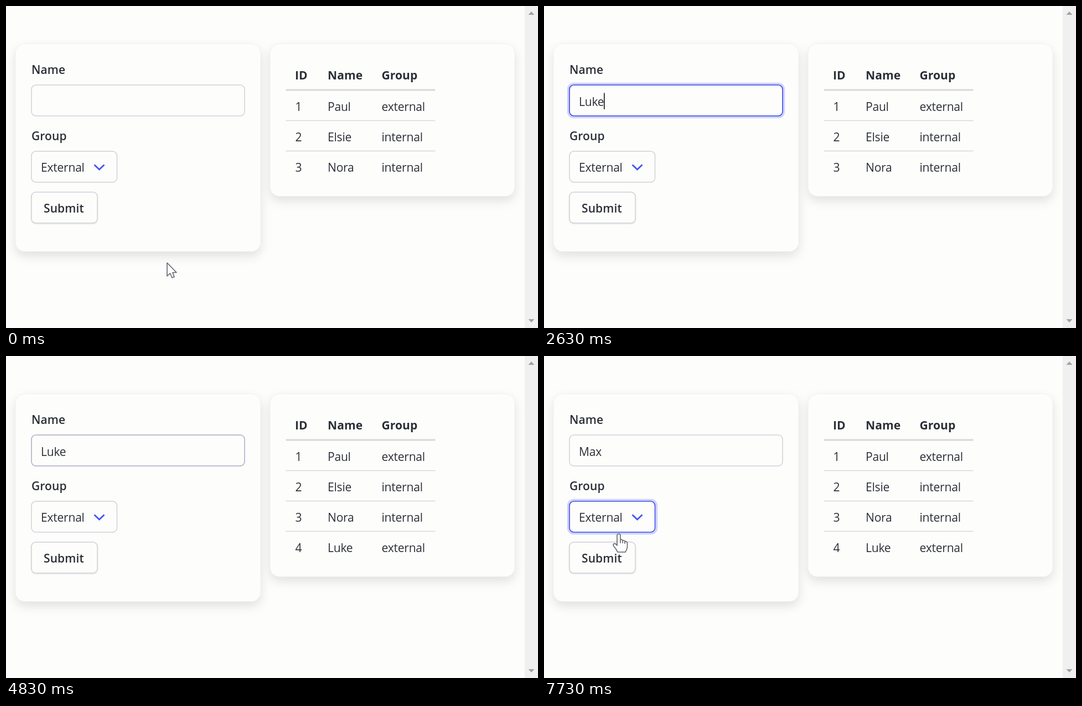
Recreate the animation shown at these times as an HTML page. Size 961 px wide and 583 px high, loop 8000 ms.

```html
<!DOCTYPE html>
<html lang="en">
<head>
<meta charset="utf-8">
<style>
html, body { margin: 0; width: 100%; height: 100%; overflow: hidden; background: #fdfdfc; }
svg { display: block; width: 961px; height: 583px; }
text { font: 21px "Open Sans", "Noto Sans", sans-serif; letter-spacing: -.2px; fill: #2b2f36; white-space: pre; }
.label { font-weight: 600; letter-spacing: .1px; }
.head { font-weight: 700; letter-spacing: .1px; }
.card { fill: #fdfdfc; stroke: #f0f0f1; filter: drop-shadow(0 8px 9px #0000001c); }
.box { fill: none; stroke: #d0d2d6; stroke-width: 1.5; }
.hover { fill: none; stroke: #b4b6cb; stroke-width: 1.5; }
.focus { fill: none; stroke: #4453f0; stroke-width: 1.6; }
.ring { fill: none; stroke: #ced3fb; stroke-width: 4.4; }
.line { stroke: #d6d8dc; stroke-width: 1.6; }
.cursor { fill: #fff; stroke: #62646c; stroke-width: 1.6; stroke-linejoin: round; }
</style>
</head>
<body>
<svg viewBox="0 0 961 583">
  <rect x="937" width="24" height="583" fill="#f0f0f0"/>
  <path d="M943.5 16l5.5-6 5.5 6zM943.5 567l5.5 6 5.5-6z" fill="#a2a2a2"/>

  <rect class="card" x="17" y="68.5" width="443" height="376" rx="17"/>
  <rect class="card" id="tableCard" x="477" y="68.5" width="442" height="276" rx="17"/>

  <text class="label" x="46" y="123">Name</text>
  <rect class="ring" id="inputRing" x="44" y="141" width="389" height="60" rx="10"/>
  <rect class="box" x="46" y="143" width="385" height="56" rx="8"/>
  <rect class="hover" id="inputHover" x="46" y="143" width="385" height="56" rx="8"/>
  <rect class="focus" id="inputFocus" x="46" y="143" width="385" height="56" rx="8"/>
  <rect id="selection" x="63" y="156" height="31" fill="#2d62cc"/>
  <text id="value" x="63" y="181"></text>
  <path id="caret" d="M0 157.5V187" stroke="#111" stroke-width="1.6"/>

  <text class="label" x="46" y="243">Group</text>
  <rect class="ring" id="selectRing" x="44" y="261" width="159" height="60" rx="10"/>
  <rect class="box" x="46" y="263" width="154.5" height="56" rx="8"/>
  <rect class="focus" id="selectFocus" x="46" y="263" width="154.5" height="56" rx="8"/>
  <text x="63" y="300">External</text>
  <path d="M159.5 287.5l9 8.5 9-8.5" fill="none" stroke="#4354f2" stroke-width="2.8"/>

  <rect class="box" x="46" y="337" width="119" height="56" rx="8" style="fill:#fdfdfc;filter:drop-shadow(0 1.5px 1px #0000001c)"/>
  <rect class="hover" id="buttonHover" x="46" y="337" width="119" height="56" rx="8" style="fill:#eeeef1"/>
  <text class="label" x="68" y="374">Submit</text>

  <g id="table">
    <text class="head" x="522" y="133">ID</text>
    <text class="head" x="581" y="133">Name</text>
    <text class="head" x="678.5" y="133">Group</text>
    <path class="line" d="M505.5 152H775.5" style="stroke-width:2.8"/>
  </g>

  <path class="cursor" id="arrow" d="M0 0V24L5.5 19 9 27 13 25.5 10 17.5H17Z"/>
  <path class="cursor" id="hand" d="M-3 3Q-3 0 0 0T3 3V11Q5.500 9 7 12Q10 11 11 13.500Q15.500 13 15.500 18V24Q15 28 12 33H-2Q-4 28-8.500 23Q-11 20-9 18Q-6 16.500-3 21ZM3 11V17M7 12V17M11 14V18"/>
</svg>
<script>
const $ = id => document.getElementById(id);
const set = (id, name, value) => $(id).setAttribute(name, value);
const clamp = v => Math.max(0, Math.min(1, v));

const rows = [["Paul", "external"], ["Elsie", "internal"], ["Nora", "internal"], ["Luke", "external"]];
$("table").innerHTML += rows.map(([name, group], i) => {
  const y = 190 + 55 * i;
  const line = i ? `<path class="line" d="M505.5 ${y - 37.5}H775.5"/>` : "";
  return `<g id="row${i + 1}">${line}<text x="522.5" y="${y}">${i + 1}</text>
    <text x="581" y="${y}">${name}</text><text x="678.5" y="${y}">${group}</text></g>`;
}).join("");

// Moves: start, end, target x, target y
const home = [291, 465];
const moves = [
  [500, 960, 210, 172],
  [3170, 3600, 59, 362],
  [4270, 4800, 100, 172],
  [6830, 7420, 135, 322]
];
// Typed text: time, value
const typing = [[0, ""], [2430, "L"], [2530, "Luk"], [2630, "Luke"], [5970, "M"], [6170, "Ma"], [6300, "Max"]];
const caretTimes = [[1400, 1930], [2430, 3160], [5370, 5430], [5970, 6830], [7360, 7430]];

function pointer(t) {
  let [x, y] = home;
  for (const [start, end, toX, toY] of moves) {
    const p = clamp((t - start) / (end - start)), e = p * p * (3 - 2 * p);
    x += (toX - x) * e;
    y += (toY - y) * e;
  }
  return [x, y];
}

function render(t) {
  const between = (a, b) => t >= a && t < b;
  const fade = (on, off) => Math.min(clamp((t - on) / 150), 1 - clamp((t - off) / 150));
  const show = (id, opacity) => set(id, "opacity", +opacity);

  show("inputHover", Math.max(fade(800, 3300), fade(4600, 7000)));
  show("inputRing", Math.max(fade(1300, 3610), fade(5370, 7430)));
  show("inputFocus", Math.max(fade(1300, 3780), fade(5370, 7430)));
  show("selectRing", fade(7430, 9000));
  show("selectFocus", fade(7430, 9000));
  show("buttonHover", fade(3500, 4370));

  const value = typing.filter(([time]) => time <= t).pop()[1];
  if ($("value").textContent !== value) $("value").textContent = value;
  const width = value ? $("value").getComputedTextLength() : 0;
  const selected = between(5430, 5970);
  set("selection", "width", selected ? width : 0);
  $("value").style.fill = selected ? "#fff" : "";
  set("caret", "transform", `translate(${63.5 + width})`);
  show("caret", caretTimes.some(([a, b]) => between(a, b)));

  const added = t >= 4000;
  show("row4", added);
  set("tableCard", "height", added ? 331 : 276);

  const [x, y] = pointer(t);
  const inside = (left, top, right, bottom) => x > left && x < right && y > top && y < bottom;
  const overText = inside(46, 143, 431, 199);
  const overControl = inside(46, 263, 201, 323) || inside(46, 337, 165, 393);
  for (const id of ["arrow", "hand"]) set(id, "transform", `translate(${x} ${y})`);
  show("arrow", !overText && !overControl);
  show("hand", overControl);
}

const begin = performance.now();
function tick() {
  render((performance.now() - begin) % 8000);
  requestAnimationFrame(tick);
}
tick();
</script>
</body>
</html>
```
